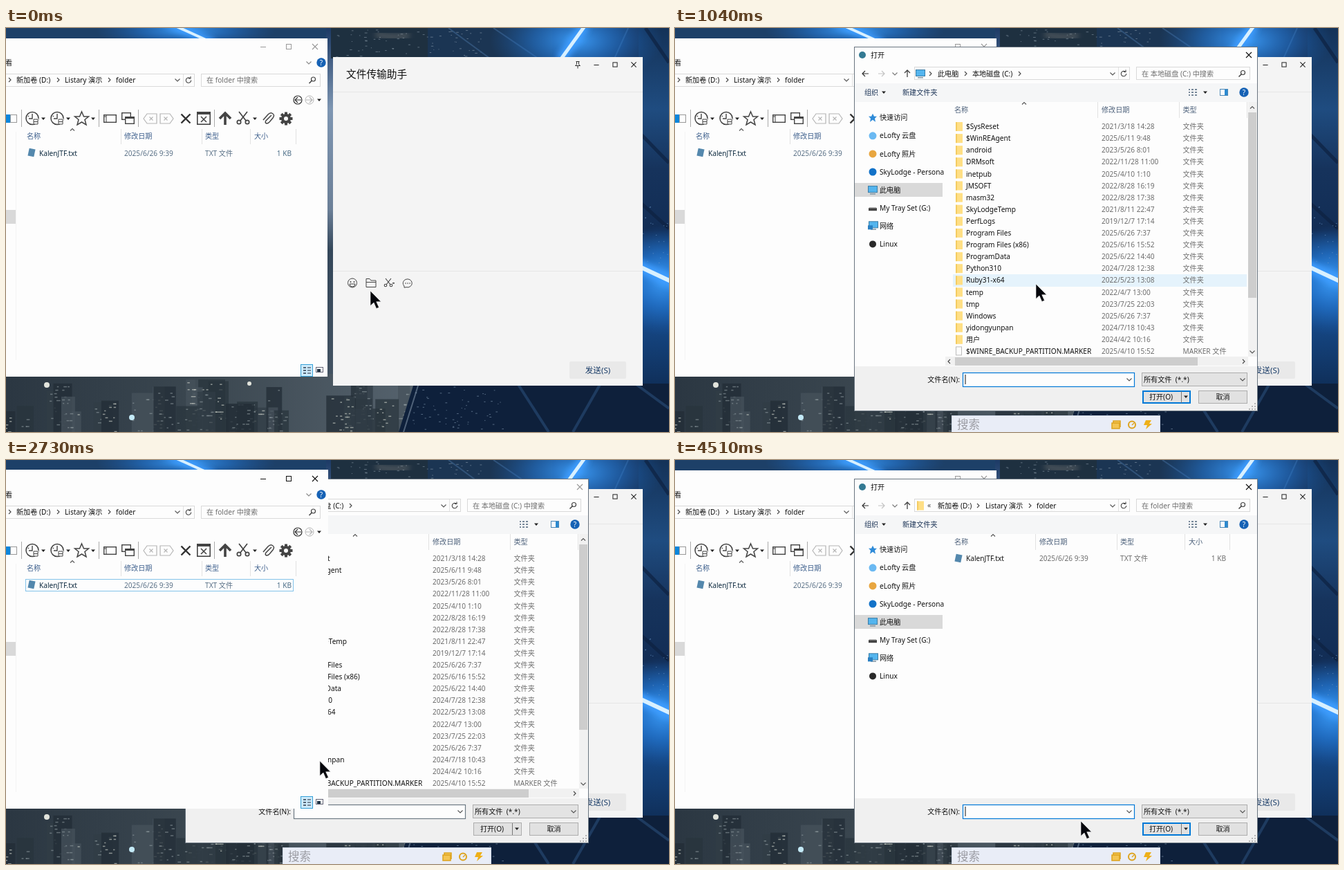
An HTML page that plays this animation: 959 by 584 pixels, repeating every 4610 ms.

```html
<!DOCTYPE html>
<html lang="zh-CN">
<head>
<meta charset="utf-8">
<title>打开</title>
<style>
html, body { margin: 0; width: 100%; height: 100%; overflow: hidden; background: #14243c }
svg { display: block; width: 100vw; height: 100vh; font-family: "Noto Sans", "Noto Sans CJK SC", "Noto Sans CJK", sans-serif }
</style>
</head>
<body>
<svg id="stage" viewBox="0 0 959 584"></svg>
<script>
const stage = document.getElementById('stage');
const BLUE = '#0078d7', GREY = '#6d6d6d', INK = '#111', PAPER = '#fdfdfd', FILE = 'KalenJTF.txt';

// Drawing helpers; text is placed by its vertical centre.
const text = (x, y, s, fill = INK, size = 10.15, anchor = 'start') =>
  `<text x="${x}" y="${y + size * .36}" font-size="${size}" fill="${fill}" text-anchor="${anchor}">${s}</text>`;
const rect = (x, y, w, h, fill, extra = '') =>
  `<rect x="${x}" y="${y}" width="${w}" height="${h}" fill="${fill}" ${extra}/>`;
const box = (x, y, w, h, fill, stroke, sw = 1) =>
  rect(x + sw / 2, y + sw / 2, w - sw, h - sw, fill, `stroke="${stroke}" stroke-width="${sw}"`);
const path = (d, stroke = '#444', sw = 1, fill = 'none', extra = '') =>
  `<path d="${d}" stroke="${stroke}" stroke-width="${sw}" fill="${fill}" ${extra}/>`;
const dot = (x, y, r, fill, stroke = 'none', sw = 1) =>
  `<circle cx="${x}" cy="${y}" r="${r}" fill="${fill}" stroke="${stroke}" stroke-width="${sw}"/>`;
const group = (id, ...parts) => `<g id="${id}">${parts.flat().join('')}</g>`;
const vline = (x, y, h, fill = '#e2e2e2') => rect(x, y, 1, h, fill);

// Shared interface glyphs
const triangle = (x, y, c = '#222') => path(`M${x - 3} ${y - 1.5}h6l-3 3.5z`, 'none', 0, c);
const down = (x, y, c = '#555') => path(`M${x - 3.5} ${y - 1.5}l3.5 3.5l3.5-3.5`, c, 1.1);
const up = (x, y, c = '#555') => path(`M${x - 3} ${y + 1.5}l3-3l3 3`, c, 1.1);
const next = (x, y, c = '#444') => path(`M${x - 1} ${y - 3}l3 3l-3 3`, c, 1.1);
const prev = (x, y, c = '#444') => path(`M${x + 1} ${y - 3}l-3 3l3 3`, c, 1.1);
const cross = (x, y, c, r = 4, sw = 1.1) => path(`M${x - r} ${y - r}l${2 * r} ${2 * r}m0 ${-2 * r}l${-2 * r} ${2 * r}`, c, sw);
const help = (x, y) => dot(x, y, 6.7, '#1662b5') + text(x, y, '?', '#fff', 10, 'middle');
const lens = (x, y) => dot(x + 1.5, y - 1.5, 3, 'none', '#444', 1.2) + path(`M${x - .5} ${y + .5}l-4 4`, '#444', 1.6);
const refresh = (x, y) => path(`M${x + 2} ${y - 3}A3.7 3.7 0 1 0 ${x + 3.7} ${y}M${x + 3} ${y - 5.5}v3h-3`, '#444', 1.1);
const folder = (x, y) => rect(x - 5, y - 6.5, 10, 13, '#ffdf85') + rect(x - 5, y - 6.5, 2, 13, '#f4cc62');
const note = (x, y) => rect(x - 4.5, y - 5.5, 9, 11, '#5488ad', `transform="rotate(12 ${x} ${y})"`);
const monitor = (x, y) => box(x - 7, y - 6, 14, 10, '#54b5ee', '#3c7da6') + rect(x - 4, y + 5, 8, 1.5, '#8095a3');
const windowButtons = (xs, y, c, r = 4) => rect(xs[0] - r, y, 2 * r, 1, c) +
  box(xs[1] - r, y - r, 2 * r, 2 * r, 'none', c) + cross(xs[2], y, c, r);
const arrowLeft = (x, y, c) => path(`M${x + 5} ${y}h-9m4-4l-4 4l4 4`, c, 1.2);
const arrowRight = (x, y, c) => path(`M${x - 5} ${y}h9m-4-4l4 4l-4 4`, c, 1.2);
const scissors = (x, y, k, sw) => path(`M${-4 * k} ${-6 * k}L${3 * k} ${3 * k}M${4 * k} ${-6 * k}L${-3 * k} ${3 * k}`,
  '#444', sw, 'none', `transform="translate(${x} ${y})"`) + dot(x - 4 * k, y + 4 * k, 1.8 * k, 'none', '#444', sw) +
  dot(x + 4 * k, y + 4 * k, 1.8 * k, 'none', '#444', sw);

let seed = 7;
const rnd = (a, b) => a + (b - a) * ((seed = seed * 16807 % 2147483647) / 2147483647);
const many = (n, f) => Array.from({ length: n }, (_, i) => f(i));

function backdrop() {
  const defs = `<defs>
    <linearGradient id="side" x2="0" y2="1"><stop stop-color="#143258"/><stop offset=".2" stop-color="#1f4c80"/>
    <stop offset=".35" stop-color="#16335c"/><stop offset=".5" stop-color="#122d55"/><stop offset=".62" stop-color="#1d6dc4"/>
    <stop offset=".74" stop-color="#154683"/><stop offset="1" stop-color="#0b1d38"/></linearGradient>
    <linearGradient id="gap" x2="0" y2="1"><stop stop-color="#1c3a66"/><stop offset=".2" stop-color="#7e96b2"/>
    <stop offset=".45" stop-color="#6b7f97"/><stop offset=".55" stop-color="#34475a"/><stop offset="1" stop-color="#4a5866"/></linearGradient>
    <linearGradient id="town"><stop stop-color="#2b3742"/><stop offset=".5" stop-color="#3c4851"/><stop offset="1" stop-color="#56636e"/></linearGradient>
    <radialGradient id="glow"><stop stop-color="#3c9bf5"/><stop offset=".5" stop-color="#2476d0" stop-opacity=".6"/>
    <stop offset="1" stop-color="#1c5fb0" stop-opacity="0"/></radialGradient>
    <filter id="soft" x="-50%" y="-50%" width="200%" height="200%"><feGaussianBlur stdDeviation="4"/></filter></defs>`;
  const beam = (d, w) => path(d, '#3d9cff', w * 3, 'none', 'filter="url(#soft)"') + path(d, '#d8f0ff', w);
  const glow = (x, y, rx, ry) => `<ellipse cx="${x}" cy="${y}" rx="${rx}" ry="${ry}" fill="url(#glow)"/>`;
  // A tower is a dark block with broken rows of lit windows.
  const towers = many(34, i => {
    const x = rnd(-10, 570), y = rnd(508, 558), w = rnd(14, 46);
    return rect(x, y, w, 80, ['#222d36', '#303c46', '#46525b', '#29343d'][i % 4], 'opacity=".75"') +
      many(12, () => rect(x + rnd(1, w - 5), y + 4 + 5 * Math.floor(rnd(0, 12)), rnd(2, 5), 1.5,
        i % 3 ? '#8d989d' : '#d3d5cd', 'opacity=".6"'));
  });
  return group('backdrop', defs, rect(0, 0, 959, 584, '#173054'), rect(0, 0, 480, 30, '#1d4068'),
    glow(260, 4, 130, 26), rect(463, 0, 12, 584, 'url(#gap)'), rect(470, 0, 150, 44, '#1e3040'), rect(610, 0, 180, 44, '#1b3553'),
    many(70, () => rect(rnd(475, 690), rnd(2, 42), rnd(1, 4), 1, '#a9b9c6', 'opacity=".45"')),
    path('M535 9q22 6 48 2', '#b9aea2', 4, 'none', 'opacity=".6" filter="url(#soft)"'),
    path('M640 0L700 44M705 0L770 44M900 0L880 44', '#3a5f88', 2, 'none', 'opacity=".7"'),
    rect(915, 0, 44, 584, 'url(#side)'),
    glow(825, 18, 125, 65), glow(950, 365, 75, 80),
    beam('M225 -12L300 22', 4), beam('M838 -4L802 46', 5), beam('M910 342L970 370', 6),
    path('M915 150L959 195M925 0L959 50M915 250L959 290', '#0e2141', 5, 'none', 'opacity=".7"'),
    many(20, () => rect(rnd(921, 957), rnd(255, 340), 1.5, 1, '#6f9acb', 'opacity=".6"')),
    rect(0, 500, 600, 84, 'url(#town)'), towers,
    dot(182, 563, 4, '#c4eaf8'), dot(59, 516, 4, '#e2e4dc'), dot(352, 514, 3, '#e2e4dc'),
    path('M590 514L568 584H959V514z', 'none', 0, '#0e203b'),
    path('M597 514L575 584', '#506279', 2), path('M740 514L785 584M860 514L820 584M910 514L959 550', '#26466f', 4, 'none', 'opacity=".7"'),
    many(60, () => rect(rnd(585, 720), rnd(518, 580), rnd(1, 3), 1, '#8fa6bd', 'opacity=".55"')));
}

function chat() {
  const line = '#e5e5e5', c = '#444';
  return group('chat', rect(473, 42, 448, 475, '#f4f4f4'), rect(473, 92, 448, 1, line), rect(473, 351, 448, 1, line),
    text(492, 67, '文件传输助手', INK, 14.7), windowButtons([854, 881, 908], 53, '#222', 3.6),
    path('M824.5 48.5h5M825.5 48.5v4l-2 2h7l-2-2v-4M827 54.5v4', '#333'),
    dot(501, 368.5, 6.5, 'none', c), dot(498.5, 367, 1, c), dot(503.5, 367, 1, c), path('M497 370h8a4 4 0 0 1-8 0z', c),
    path('M521 374.5v-12h5l2 2.5h7v9.5zM521 367.5h14', c),
    scissors(553, 368, 1, 1.1), rect(559, 368, 3, 1.5, c),
    path('M576 373a6.5 6 0 1 1 3 1.7l-3 .5z', c), [578, 581, 584].map(x => dot(x, 369, .8, c)),
    rect(815, 482, 82, 25, '#e9e9e9', 'rx="2"'), text(856, 495, '发送(S)', '#173a66', 11.6, 'middle'));
}

function explorer() {
  const head = '#3d5f8c', c = '#444', dim = '#b5b5b5';
  const clock = x => dot(x, 130.5, 9, 'none', c, 1.5) + path(`M${x} 124v7h-5M${x - 6} 127l1 1`, c, 1.4) +
    rect(x + 1, 131, 8, 8, PAPER) + path(`M${x + 2} 132h6v7h-6zM${x + 2} 135.5h6`, c);
  const tag = (x, s) => path(`M${x - 9 * s} 131l${5 * s}-7h${14 * s}v14h${-14 * s}z`, dim, 1.2) + cross(x + 2 * s, 131, dim, 2.5);
  const teeth = many(8, i => `<rect x="403" y="121.5" width="4" height="5" fill="${c}" transform="rotate(${i * 45} 405 131)"/>`);
  return group('explorer', rect(0, 15, 465, 489, PAPER),
    group('idle', windowButtons([372, 409, 447], 27, '#999')),
    group('active', rect(0, 14, 466, 1, PAPER), vline(465, 14, 490, PAPER), windowButtons([372, 409, 447], 27, INK),
      box(28, 172, 388, 18, 'none', '#83c3ea')),
    text(-1, 50, '看'), down(438, 50, '#888'), help(456, 50),
    box(-2, 66, 275, 19, PAPER, '#dadada'), vline(256, 67, 17), next(5, 75), text(15, 75, '新加卷 (D:)'), next(75, 75),
    text(85, 75, 'Listary 演示'), next(149, 75), text(159, 75, 'folder'), down(248, 75), refresh(264, 75.5),
    box(282, 66, 173, 19, PAPER, '#dadada'), text(290, 75.5, '在 folder 中搜索', GREY), lens(443, 75.5),
    dot(422, 104, 6, 'none', '#333', 1.2), arrowLeft(422, 104, '#333'),
    dot(439, 104, 6, 'none', dim), arrowRight(439, 104, dim), triangle(453, 104),
    rect(0, 125, 6, 12, '#0b86dc'), box(6, 125, 10, 12, PAPER, '#999'),
    [22, 134, 191, 301].map(x => vline(x, 118, 25, '#aaa')), [54, 90, 126, 360].map(x => triangle(x, 131)),
    clock(38), clock(74), path('M109.500 121l3 7h7l-5.500 4.500l2 7.500l-6.500-4l-6.500 4l2-7.500l-5.500-4.500h7z', c, 1.5),
    box(141, 125, 19, 12, PAPER, c, 1.4), path('M141 128h4M145 125v12', c),
    box(167, 122, 14, 11, PAPER, c, 1.4), box(172, 128, 14, 11, PAPER, c, 1.4), rect(172, 128, 14, 3, c),
    tag(208, 1), tag(233, -1), cross(260, 131, '#333', 6.5, 2.4),
    box(276, 121, 20, 19, PAPER, c, 1.6), rect(276, 121, 20, 4, c), cross(286, 132, c, 4, 1.6),
    path('M317 140v-16M309 131l8-8l8 8', c, 3.6), scissors(343, 130, 1.5, 1.7),
    path('M384 126l-8 8q-2 3 1 4q2 0 4-2l5-6q3-4 0-6q-3-3-7 1l-7 8', c, 1.5),
    teeth, dot(405, 131, 5, 'none', c, 4),
    up(96, 147), [166, 283, 353, 419].map(x => vline(x, 146, 22)), vline(14, 150, 330, '#f4f4f4'),
    [[30, '名称'], [171, '修改日期'], [288, '类型'], [359, '大小']].map(([x, s]) => text(x, 156, s, head)),
    note(37, 180), text(48, 181, FILE, '#0d2a3f'), text(171, 181, '2025/6/26 9:39', '#597086'),
    text(288, 181, 'TXT 文件', '#597086'), text(413, 181, '1 KB', '#4a6c86', 10.15, 'end'),
    rect(0, 263, 14, 20, '#d9d9d9'), box(426, 486, 18, 18, '#cdeafa', '#35a0d8'),
    [490, 494, 498].map(y => rect(430, y, 4, 2, '#567') + rect(436, y, 5, 2, '#789')),
    box(448, 490, 11, 8, PAPER, '#667'), rect(450, 493, 5, 4, '#234'));
}

const rows = `$SysReset|2021/3/18 14:28
$WinREAgent|2025/6/11 9:48
android|2023/5/26 8:01
DRMsoft|2022/11/28 11:00
inetpub|2025/4/10 1:10
JMSOFT|2022/8/28 16:19
masm32|2022/8/28 17:38
SkyLodgeTemp|2021/8/11 22:47
PerfLogs|2019/12/7 17:14
Program Files|2025/6/26 7:37
Program Files (x86)|2025/6/16 15:52
ProgramData|2025/6/22 14:40
Python310|2024/7/28 12:38
Ruby31-x64|2022/5/23 13:08
temp|2022/4/7 13:00
tmp|2023/7/25 22:03
Windows|2025/6/26 7:37
yidongyunpan|2024/7/18 10:43
用户|2024/4/2 10:16
$WINRE_BACKUP_PARTITION.MARKER|2025/4/10 15:52`.split('\n').map(r => r.split('|'));

const places = [
  ['快速访问', (x, y) => path(`M${x} ${y - 6}l2 4h4l-3 3l1 5l-4-3l-4 3l1-5l-3-3h4z`, 'none', 0, '#2f8bd8')],
  ['eLofty 云盘', (x, y) => dot(x, y, 5.5, '#6bb9f2')],
  ['eLofty 照片', (x, y) => dot(x, y, 5.5, '#e8a640')],
  ['SkyLodge - Persona', (x, y) => dot(x, y, 5.5, '#1272c8')],
  ['此电脑', monitor],
  ['My Tray Set (G:)', (x, y) => rect(x - 6, y, 12, 4, '#444') + rect(x - 5, y - 1, 10, 1, '#aaa')],
  ['网络', (x, y) => monitor(x + 1, y - 1) + rect(x - 7, y - 1, 7, 6, '#2a80c2')],
  ['Linux', (x, y) => dot(x, y, 5, '#292929')]];

function dialog() {
  const heads = (items, lines) => items.map(([x, s]) => text(x, 118, s, '#4c607a')).join('') +
    lines.map(x => vline(x, 107, 23)).join('');
  const list = rows.map(([name, date], i) => {
    const y = 142.5 + 17.1 * i, last = i == rows.length - 1;
    return (last ? box(406, y - 7, 9, 13, PAPER, '#bbb') : folder(411, y)) +
      text(421, y, name) + text(617, y, date, GREY) + text(734.5, y, last ? 'MARKER 文件' : '文件夹', GREY);
  });
  return group('dialog', box(259, 27, 584, 527, PAPER, '#6a7580'),
    dot(271, 39, 5, '#347a93'), text(283, 39.5, '打开'),
    group('closeOn', cross(830, 39, INK)), group('closeOff', cross(830, 39, '#999')),
    arrowLeft(275, 66, '#333'), arrowRight(299, 66, '#c4c4c4'), down(318, 66, '#777'),
    path('M336 71v-10m-4 4l4-4l4 4', '#444', 1.3),
    box(346, 56, 312, 19, PAPER, '#d9d9d9'), vline(641, 57, 17), down(633, 66), refresh(649, 66),
    box(667, 56, 165, 19, PAPER, '#d9d9d9'), lens(820, 66),
    rect(260, 80, 582, 27, '#f5f6f7'),
    group('tools', text(274, 93.5, '组织', '#1d3557'), triangle(302, 93), text(329, 93.5, '新建文件夹', '#1d3557'),
      [89, 93, 97].map(y => rect(743, y - 1, 2, 2, '#789') + rect(747, y - 1, 3, 2, '#789') + rect(752, y - 1, 3, 2, '#789')),
      triangle(767, 93)),
    box(788, 88, 12, 10, PAPER, '#4a88b8'), rect(795, 89, 4, 8, '#2c8ad0'), help(823, 93),
    rect(260, 224, 127, 20, '#d9d9d9'),
    places.map(([name, icon], i) => icon(286, 129.700 + 26.1 * i) + text(296, 129.700 + 26.1 * i, name)),
    group('drive', monitor(355, 66), next(369, 66), text(380, 66, '此电脑'), next(420, 66), text(430, 66, '本地磁盘 (C:)'), next(498, 66),
      text(675, 66, '在 本地磁盘 (C:) 中搜索', GREY), up(505, 109),
      heads([[404, '名称'], [617, '修改日期'], [734.5, '类型']], [611, 729, 827]),
      rect(402, 356, 425, 18, '#e5f3fc', 'id="hover"'), list,
      rect(829, 107, 13, 368, '#f1f1f1'), rect(829, 122, 12, 268, '#cdcdcd'), up(835, 115), down(835, 468),
      rect(391, 475, 438, 13, '#f1f1f1'), rect(405, 476, 351, 12, '#cdcdcd'), prev(397, 482), next(822, 482)),
    group('target', folder(355, 66), text(365, 65, '«', '#444'), text(380, 66, '新加卷 (D:)'), next(438, 66), text(449, 66, 'Listary 演示'),
      next(513, 66), text(523, 66, 'folder'), text(675, 66, '在 folder 中搜索', GREY), up(460, 109),
      heads([[404, '名称'], [527, '修改日期'], [644, '类型'], [743, '大小']], [521, 639, 737, 802]),
      note(410, 142), text(421, 142.500, FILE), text(527, 142.500, '2025/6/26 9:39', GREY), text(644, 142.500, 'TXT 文件', GREY),
      text(797, 142.500, '1 KB', GREY, 10.15, 'end')),
    rect(260, 489, 582, 64, '#f0f0f0'), text(412, 508, '文件名(N):', INK, 10.15, 'end'),
    rect(416.5, 498.5, 248, 20, PAPER, 'id="field" stroke-width="1.2"'), rect(419.5, 501, 1, 14, INK, 'id="caret"'), down(657, 508),
    box(675, 498, 153, 20, '#e3e3e3', '#adadad'), text(678, 508, '所有文件&#160; (*.*)'), down(821, 508),
    box(676, 524, 70, 19, '#e1e1e1', '#adadad'),
    group('ring', box(676, 524, 70, 19, 'none', BLUE, 2)), vline(732, 525, 17, '#777'),
    text(703, 533.5, '打开(O)', INK, 10.15, 'middle'), triangle(739, 533),
    box(757, 524, 71, 19, '#e1e1e1', '#adadad'), text(792.5, 533.5, '取消', INK, 10.15, 'middle'),
    [[838, 543], [838, 547], [838, 551], [834, 547], [834, 551], [830, 551]].map(([x, y]) => rect(x, y - 1, 2, 2, '#b5b5b5')));
}

const searchBar = () => group('bar', box(400, 560, 302, 30, '#e9edf7', '#d0d8e8'), text(408, 573, '搜索', '#9b9ca3', 16.5),
  path('M632 579v-8h11v8zM634 571v-3h10v9', '#dda31e', 1.5, '#f3c552'), dot(661, 573.5, 5, 'none', '#dda31e', 2),
  path('M661 574l3-3', '#dda31e', 1.5), path('M681 567h8l-3 5h4l-9 8l2-6h-5z', 'none', 0, '#eeb019'));

stage.innerHTML = backdrop() + chat() + explorer() + dialog() + searchBar() +
  group('click', dot(0, 0, 10, '#f4f01c')) +
  group('pointer', path('M0 0V21.500L5 17L8.700 25.500L12.500 24L8.800 15.700H15.500Z', '#fff', .6, '#05060c'));

const el = {};
stage.querySelectorAll('[id]').forEach(e => el[e.id] = e);
const show = (id, on) => el[id].style.display = on ? '' : 'none';

const LOOP = 4610, OPEN = 540, RAISE = 1500, ACTIVATE = 1750, RETURN = 3490, JUMP = 3690;
const clicks = [[270, 370], [1480, 1650], [3430, 3580]];
const trail = [[0, 527, 380], [30, 527, 380], [370, 522, 370], [1140, 522, 370], [1240, 500, 372], [1330, 365, 362],
  [1420, 187, 356], [1480, 147, 352], [1700, 147, 352], [2240, 217, 372], [2340, 217, 372], [2540, 325, 395],
  [2740, 460, 437], [2860, 517, 462], [2960, 525, 469], [3160, 555, 497], [3460, 586, 521], [4509, 586, 521],
  [4510, 587, 522], [LOOP, 587, 522]];

function pointerAt(t) {
  const i = trail.findIndex(k => k[0] > t), [t0, x0, y0] = trail[i - 1], [t1, x1, y1] = trail[i];
  const p = (t - t0) / (t1 - t0);
  return [x0 + (x1 - x0) * p, y0 + (y1 - y0) * p];
}

let raised = false;
function draw(t) {
  const step = Math.floor((t - OPEN) / 100), settled = step >= 5;
  const scale = settled ? 1 : 1 - .038 * .57 ** step;
  const away = t >= ACTIVATE && t < RETURN, front = t >= RAISE && t < RETURN;
  show('dialog', t >= OPEN);
  el.dialog.setAttribute('opacity', settled ? 1 : 1 - .7 * .464 ** step);
  el.dialog.setAttribute('transform', `translate(551 290.5) scale(${scale}) translate(-551 -290.5)`);
  if (front != raised) {
    raised = front;
    stage.insertBefore(front ? el.explorer : el.dialog, el.bar);
  }
  show('bar', t >= 520);
  show('tools', step >= 1);
  show('active', away);
  show('idle', !away);
  show('closeOff', away);
  show('closeOn', !away);
  show('ring', !away);
  show('hover', t < 1240);
  show('drive', t < JUMP);
  show('target', t >= JUMP);
  show('caret', t >= 740 && t < 1240 || t >= 4170);
  const q = away ? Math.min(1, (t - ACTIVATE) / 1100) : 0;
  el.field.setAttribute('stroke', `rgb(${122 * q},${120 + 2 * q},${215 - 93 * q})`);
  const [x, y] = pointerAt(t);
  el.pointer.setAttribute('transform', `translate(${x} ${y})`);
  el.click.setAttribute('transform', `translate(${x + 1} ${y})`);
  show('click', clicks.some(([a, b]) => t >= a && t < b));
}

const start = performance.now();
(function tick() {
  draw((performance.now() - start) % LOOP);
  requestAnimationFrame(tick);
})();
</script>
</body>
</html>
```
